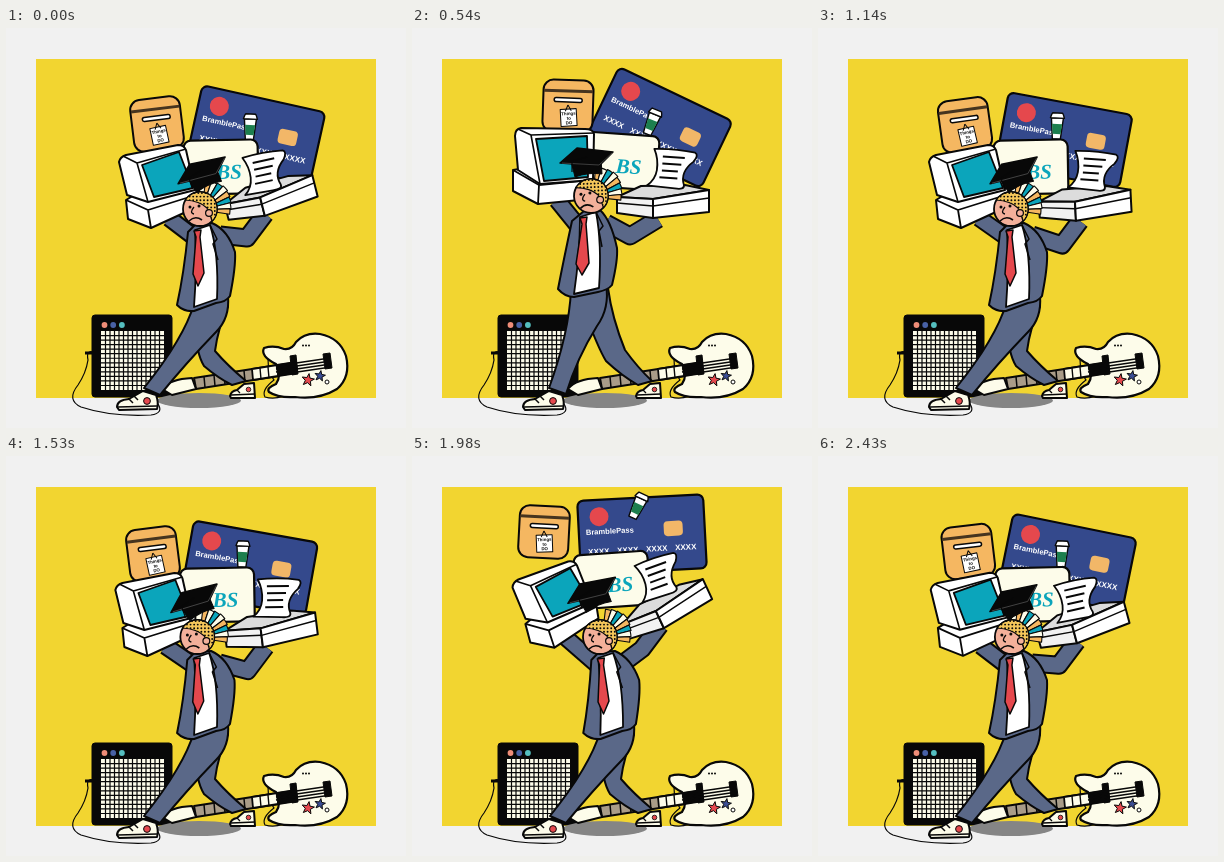
Write an HTML page with a canvas that moves like this. It is 400 px wide and 400 px high and loops after 2.46 s.

```html
<!DOCTYPE html>
<html lang="en">
<head>
<meta charset="utf-8">
<title>Balancing act</title>
<style>
html, body { margin: 0; width: 100%; height: 100%; overflow: hidden; background: #f1f1f1; }
canvas { display: block; width: 400px; height: 400px; }
</style>
</head>
<body>
<canvas id="stage"></canvas>
<script>
const LOOP = 2460, STEP = 30;
const canvas = document.getElementById('stage');
const g = canvas.getContext('2d');
const dpr = window.devicePixelRatio || 1;
canvas.width = canvas.height = 400 * dpr;

const INK = '#080808', CREAM = '#fdfcea', WHITE = '#fff', SUIT = '#5a6888',
  RED = '#e5484d', TEAL = '#0ba5bb', SKIN = '#f3b09a', TAN = '#f5b761', NAVY = '#34498c';

// Key times and the value of every channel at each of them
const TIMES = [0, 540, 780, 1140, 1590, 1980, 2090];
const parts = {
  card:  { x: [250, 248, 256, 246, 243, 230, 231], y: [107, 99.5, 105, 112, 112, 78.5, 74], r: [12.5, 25.5, 27, 10.5, 10, -3, -2] },
  cup:   { x: [244, 240, 254, 239, 236, 226, 228], y: [99, 94, 98, 98, 98, 50, 45], r: [3, 22, 26, 3, 3, 25, 28] },
  box:   { x: [151, 156, 178, 147, 147, 132, 133], y: [96, 78, 78, 97, 98, 76, 71], r: [-7, 2, 20, -8, -7, 3, 3] },
  panel: { x: [215, 209, 219, 213, 211, 200, 202], y: [139, 133, 137, 139, 139, 124, 121], r: [-1, 4, 5, -1, -1, -4, -5] },
  pc:    { x: [0, 0, 12, -2, -4, -11, -11], y: [0, 0, 7, 0, 0, -10, -13], r: [0, 0, 0, 0, 0, -9, -11] },
  tray:  { x: [268, 255, 262, 271, 268, 257, 258], y: [167, 172, 177, 174, 171, 150, 147], r: [-14, 0, 2, -3, -8, -25, -26] },
  sheet: { x: [257, 258, 270, 273, 268, 245, 247], y: [145, 141, 145, 143, 142, 122, 119], r: [-12, 4, 8, 4, -2, -20, -22] },
  cap:   { x: [195, 174, 187, 195, 186, 179, 181], y: [142, 129, 130, 142, 142, 134, 133], r: [-18, 0, 2, -18, -20, -17, -17] },
  head:  { x: [194, 179, 184, 193, 191, 188, 188], y: [181, 168, 171, 181, 181, 181, 181], r: [0, -2, 0, 0, 0, 0, 0] },
  body:  { rise: [0, 1, 1, 0, 0, 0, 0], lean: [0, 0, 7, 0, -1, -3, -3] }
};

// Periodic monotone cubic through the key values
function sample(v, t) {
  const n = v.length, wrap = i => (i + n) % n;
  const span = i => (TIMES[wrap(i + 1)] - TIMES[wrap(i)] + LOOP) % LOOP;
  const slope = i => (v[wrap(i + 1)] - v[wrap(i)]) / span(i);
  const tangent = i => {
    const a = slope(i - 1), b = slope(i);
    return a * b > 0 ? 2 * a * b / (a + b) : 0;
  };
  let k = n - 1;
  while (TIMES[k] > t) k--;
  const h = span(k), s = (t - TIMES[k]) / h, s2 = s * s, s3 = s2 * s;
  return v[k] * (2 * s3 - 3 * s2 + 1) + v[wrap(k + 1)] * (3 * s2 - 2 * s3)
    + h * (tangent(k) * (s3 - 2 * s2 + s) + tangent(k + 1) * (s3 - s2));
}

function poseAt(t) {
  const pose = {};
  for (const name in parts) {
    pose[name] = {};
    for (const ch in parts[name]) pose[name][ch] = sample(parts[name][ch], t);
  }
  return pose;
}

// Blend two path strings that have the same commands
function mix(a, b, u) {
  const num = /-?[\d.]+/g, to = b.match(num);
  let i = 0;
  return a.replace(num, n => +n + (to[i++] - n) * u);
}

function shape(d, fill, width = 2, stroke = INK) {
  const p = new Path2D(d);
  if (fill) { g.fillStyle = fill; g.fill(p); }
  if (width) { g.lineWidth = width; g.strokeStyle = stroke; g.stroke(p); }
}
function dot(x, y, r, fill, width = 0) {
  g.beginPath();
  g.arc(x, y, r, 0, 7);
  g.fillStyle = fill;
  g.fill();
  if (width) { g.lineWidth = width; g.strokeStyle = INK; g.stroke(); }
}
function round(x, y, w, h, r, fill, width = 2) {
  g.beginPath();
  g.roundRect(x, y, w, h, r);
  g.fillStyle = fill;
  g.fill();
  if (width) { g.lineWidth = width; g.strokeStyle = INK; g.stroke(); }
}
function label(s, x, y, font, fill, align = 'left') {
  g.font = font;
  g.fillStyle = fill;
  g.textAlign = align;
  g.fillText(s, x, y);
}
function place(p, draw) {
  g.save();
  g.translate(p.x, p.y);
  g.rotate(p.r * Math.PI / 180);
  draw();
  g.restore();
}
// Thick outlined stroke for sleeves
function limb(d, w) {
  shape(d, null, w + 4);
  shape(d, null, w, SUIT);
}

function star(x, y, r, fill) {
  let d = '';
  for (let i = 0; i < 10; i++) {
    const a = i * Math.PI / 5 - 1.4, q = i % 2 ? r * .42 : r;
    d += (i ? 'L' : 'M') + (x + q * Math.cos(a)) + ',' + (y + q * Math.sin(a));
  }
  shape(d + 'Z', fill, 1);
}

function drawAmp() {
  shape('M87,324 Q80,322 82,332 Q80,345 72,357 Q60,372 75,379 Q105,389 145,387 Q158,385 152,376', null, 1.2);
  shape('M79,325 L88,325', null, 3);
  round(86, 287, 80, 82, 3, INK, 1);
  round(95, 303, 63, 59, 0, CREAM, 0);
  let d = '';
  for (let i = 1; i < 14; i++) d += `M${95 + i * 4.5},303 v59`;
  for (let i = 1; i < 13; i++) d += `M95,${303 + i * 4.54} h63`;
  shape(d, null, 1.2);
  ['#ef8d78', '#4861a5', '#55bfc0'].forEach((c, i) => dot(98.5 + i * 8.7, 297, 2.9, c));
}

function drawGuitar() {
  shape('M262,331 Q262,345 268,352 Q255,362 259,369 Q272,373 288,363', null, 1.2);
  shape('M258,320 Q268,317 278,321 Q286,322 290,314 Q299,304 314,306 Q334,310 340,328 Q345,349 331,361 Q313,372 289,369 Q272,370 263,364 Q260,360 270,356 Q276,348 270,336 Q254,328 258,320Z', CREAM, 2.2);
  shape('M188,350 L272,337 L273,348 L190,361Z', '#a99c88', 2);
  let frets = '';
  for (let i = 1; i < 9; i++) frets += `M${188 + i * 10},${350 - i * 1.5} l1,11`;
  shape(frets, null, 1.5);
  shape('M246,341 L290,334 L291,345 L247,352Z', CREAM, 1.8);
  shape('M254,340 l1,11 M262,339 l1,11', null, 1.4);
  shape('M156,361 Q164,351 186,350 L190,361 L166,367Z', CREAM, 2);
  shape('M270,337 L290,334 L291,345 L272,348Z M284,328 L290,327 L292,346 L286,347Z M317,326 L324,325 L326,340 L319,341Z', INK, 1);
  shape('M270,338 L324,330 M270,341 L325,333 M270,344 L325,336 M271,347 L325,339', null, 1.4);
  [297, 300, 303].forEach(x => dot(x, 317.5, 1, INK));
  star(302, 352, 6.5, RED);
  star(314, 348, 5.5, '#3b4d94');
  dot(321, 354, 2, WHITE, 1);
}

function drawShoes() {
  shape('M111,379 Q111,372 123,371 L137,363 L150,367 Q153,375 151,381 L113,382Z', CREAM, 2);
  shape('M112,379 L151,378 M123,371 l4,4 M128,368 l4,4', null, 1.5);
  dot(141, 373, 3.4, RED, 1);
  shape('M224,368 Q225,363 231,362 L238,356 L248,355 L249,370 L225,370Z', CREAM, 2);
  shape('M225,367 L249,366 M231,362 l3,3', null, 1.3);
  dot(242.5, 361.5, 2.3, RED, .8);
}

function drawLegs(u) {
  shape(mix('M190,300 Q190,325 198,338 Q212,350 226,357 L240,353 Q222,338 209,323 Q212,300 222,278Z',
    'M172,282 Q186,320 194,333 Q210,348 226,357 L240,353 Q226,340 213,322 Q200,290 196,260Z', u), SUIT);
  shape(mix('M188,276 Q178,310 138,360 L154,367 Q180,335 210,304 Q224,290 222,268Z',
    'M159,262 Q157,305 137,360 L154,366 Q165,330 185,298 Q198,280 194,256Z', u), SUIT);
}

function drawArms(p, u) {
  const b = p.body.lean * .9, left = [163 - 18 * u + p.pc.x, 190 - 18 * u + p.pc.y];
  limb(`M${188 - 22 * u + b},${209 - 11 * u} L${left}`, 14);
  const hand = [p.tray.x - 9, p.tray.y + 19];
  const elbow = [hand[0] - 18 - 10 * u, hand[1] + 24 - 7 * u];
  limb(`M${214 - 20 * u + b},${207 - 12 * u} L${elbow} L${hand}`, 15);
}

function drawTorso(u, lean) {
  g.save();
  g.transform(1, 0, -lean / 75, 1, lean * 3.6, 0);
  shape(mix('M190,196 L182,204 Q178,245 171,277 Q178,284 188,283 L210,275 Q220,274 224,268 Q230,238 229,224 Q222,202 206,195Z',
    'M172,183 L160,193 Q152,230 146,261 Q153,269 162,269 L186,264 Q196,262 200,257 Q206,232 205,220 Q199,192 188,182Z', u), SUIT);
  shape(mix('M189,202 L204,197 Q213,225 211,271 L188,279 Q191,240 189,202Z',
    'M168,189 L184,184 Q190,215 187,260 L162,266 Q168,225 168,189Z', u), WHITE, 1.8);
  shape(mix('M188,203 L195,202 L194,209 L198,245 L192,258 L187,246 L190,209Z',
    'M168,190 L175,189 L174,196 L177,235 L170,247 L164,236 L170,196Z', u), RED, 1.5);
  shape(mix('M204,197 L211,211 L207,216 L212,232', 'M184,184 L191,198 L187,203 L190,219', u), null, 1.5);
  g.restore();
}

function drawCard() {
  round(-63, -37, 126, 74, 6, NAVY, 2.2);
  dot(-42, -20, 9.5, RED);
  label('BramblePass', -56, -2.5, 'bold 7.6px "Liberation Sans", Arial, sans-serif', WHITE);
  round(22, -12, 19, 15, 4, '#f2b768', 0);
  for (let i = 0; i < 4; i++)
    label('XXXX', -44 + i * 29, 17.5, 'bold 8px "Liberation Sans", Arial, sans-serif', WHITE, 'center');
}

function drawCup() {
  shape('M-6,-8 L6,-8 L4,13 L-4,13Z', WHITE, 1.4);
  shape('M-5,-2 L5,-2 L4,8 L-4,8Z', '#1d7f4f', 0);
  dot(0, 3, 3, '#1d7f4f');
  shape('M-7,-8 L-6,-11 L-5,-13 L5,-13 L6,-11 L7,-8Z', WHITE, 1.4);
}

function drawBox() {
  round(-25, -26, 50, 52, 10, TAN, 2);
  shape('M-24.5,-15 L24.5,-15', null, 3, '#46341f');
  round(-14, -8, 28, 4, 2, WHITE, 1.5);
  g.save();
  g.translate(1, 11);
  g.rotate(-.09);
  shape('M-8,-8 H8 V9 H-8Z', WHITE, 1);
  shape('M0,-12 L-3,-6 M0,-12 L3,-6', null, 1);
  ['Things', 'to', 'DO'].forEach((s, i) =>
    label(s, 0, -2 + i * 4.6, 'bold 4.4px "Liberation Sans", Arial, sans-serif', INK, 'center'));
  g.restore();
}

function drawPanel() {
  round(-37, -27, 74, 54, 7, CREAM, 2.2);
  label('BS', 8, 12, 'italic bold 21px "Liberation Serif", "Times New Roman", serif', TEAL, 'center');
}

function drawComputer(p, u) {
  const cx = 160 - 10 * u, cy = 147 - 17 * u;
  place({ x: cx + p.x, y: cy + p.y, r: p.r }, () => {
    g.translate(-cx, -cy);
    shape(mix('M120,172 L140,160 L193,160 L193,178 L145,200 L122,191Z',
      'M101,142 L125,138 L178,150 L178,171 L126,176 L101,163Z', u), WHITE);
    shape(mix('M120,172 L142,182 L193,166 M142,182 L145,200',
      'M101,142 L127,157 L178,152 M127,157 L126,176', u), null, 1.8);
    shape(mix('M113,134 Q114,129 120,127 L172,117 Q178,117 180,122 L189,162 L142,174 L121,167Z',
      'M103,108 Q103,101 109,100 L173,101 Q181,101 182,106 L181,152 L128,156 L106,142Z', u), WHITE);
    shape(mix('M117,128 L131,135 L142,174 M131,135 L180,121', 'M106,101 L119,107 L128,156 M119,107 L182,105', u), null, 1.6);
    shape(mix('M136,137 L173,124 L187,160 L148,169Z', 'M124,111 L175,108 L176,149 L132,153Z', u), TEAL, 1.8);
  });
}

function drawTray() {
  shape('M-50,-3 L-14,-1 L42,-10 L18,-15 L-26,-14Z', '#dcdcdc', 2);
  shape('M-50,-3 L-14,-1 L-14,18 L-50,13Z', '#f2f2f2', 2);
  shape('M-14,-1 L42,-10 L42,12 L-14,18Z', WHITE, 2);
  shape('M-50,3 L-14,6 L42,-2', null, 1.4);
}

function drawSheet() {
  shape('M-17,-19 Q4,-21 24,-18 Q28,-16 23,-9 Q10,2 15,15 Q16,20 6,19 L-22,18 Q-14,12 -13,2 Q-12,-9 -17,-19Z', WHITE, 1.8);
  shape('M-8,-12 L14,-12 M-8,-5 L11,-5 M-8,2 L8,2 M-10,9 L8,9', null, 2);
}

function drawHead() {
  const stripes = [TAN, CREAM, TEAL, CREAM, TAN, TEAL, CREAM, TAN];
  stripes.forEach((c, i) => {
    const a = -1.45 + i * .2;
    g.beginPath();
    g.moveTo(2, 1);
    g.arc(2, 1, 32 - Math.abs(i - 3), a, a + .2);
    g.closePath();
    g.fillStyle = c;
    g.fill();
    g.lineWidth = 1.1;
    g.strokeStyle = INK;
    g.stroke();
  });
  dot(0, 0, 17, SKIN, 1.8);
  const hair = 'M-15,-9 Q-8,-18 2,-17 Q18,-14 17,2 Q16,9 12,12 Q10,4 7,-1 Q0,-8 -15,-9Z';
  shape(hair, '#f4c65a', 1.2);
  g.save();
  g.clip(new Path2D(hair));
  for (let y = -16; y < 13; y += 3.6)
    for (let x = -14; x < 18; x += 3.6) dot(x + (y % 2 ? 0 : 1.5), y, .95, INK);
  g.restore();
  dot(9, 4, 3.4, SKIN, 1.2);
  dot(-10, -2, 1.5, INK);
  dot(-1, -3, 1.5, INK);
  shape('M-6,-2 Q-11,4 -6,5', null, 1.3);
  shape('M-11,12 Q-5,6 2,11', null, 1.6);
}

function drawCap() {
  shape('M-15,4 L15,2 L16,17 Q2,15 -11,20Z', INK, 1);
  shape('M-26,6 L-9,-9 L27,-5 L13,9Z', INK, 1.5);
  shape('M-24,6 L13,8 L26,-4', null, .7, '#555');
  shape('M1,0 L-14,4 L-14,15', null, 1.2);
}

function draw(t) {
  const p = poseAt(t), u = p.body.rise;
  g.setTransform(dpr, 0, 0, dpr, 0, 0);
  g.lineJoin = 'round';
  g.fillStyle = '#f1f1f1';
  g.fillRect(0, 0, 400, 400);
  g.fillStyle = '#f2d530';
  g.fillRect(30, 31, 340, 339);
  drawAmp();
  g.beginPath();
  g.ellipse(193, 372.5, 42, 7.5, 0, 0, 7);
  g.fillStyle = '#858585';
  g.fill();
  drawGuitar();
  drawShoes();
  drawLegs(u);
  drawArms(p, u);
  place(p.card, drawCard);
  place(p.box, drawBox);
  place(p.cup, drawCup);
  place(p.panel, drawPanel);
  drawComputer(p.pc, u);
  place(p.tray, drawTray);
  place(p.sheet, drawSheet);
  drawTorso(u, p.body.lean);
  place(p.head, drawHead);
  place(p.cap, drawCap);
}

function tick() {
  const t = performance.now() % LOOP;
  draw(Math.floor(t / STEP) * STEP);
  requestAnimationFrame(tick);
}
tick();
</script>
</body>
</html>
```
